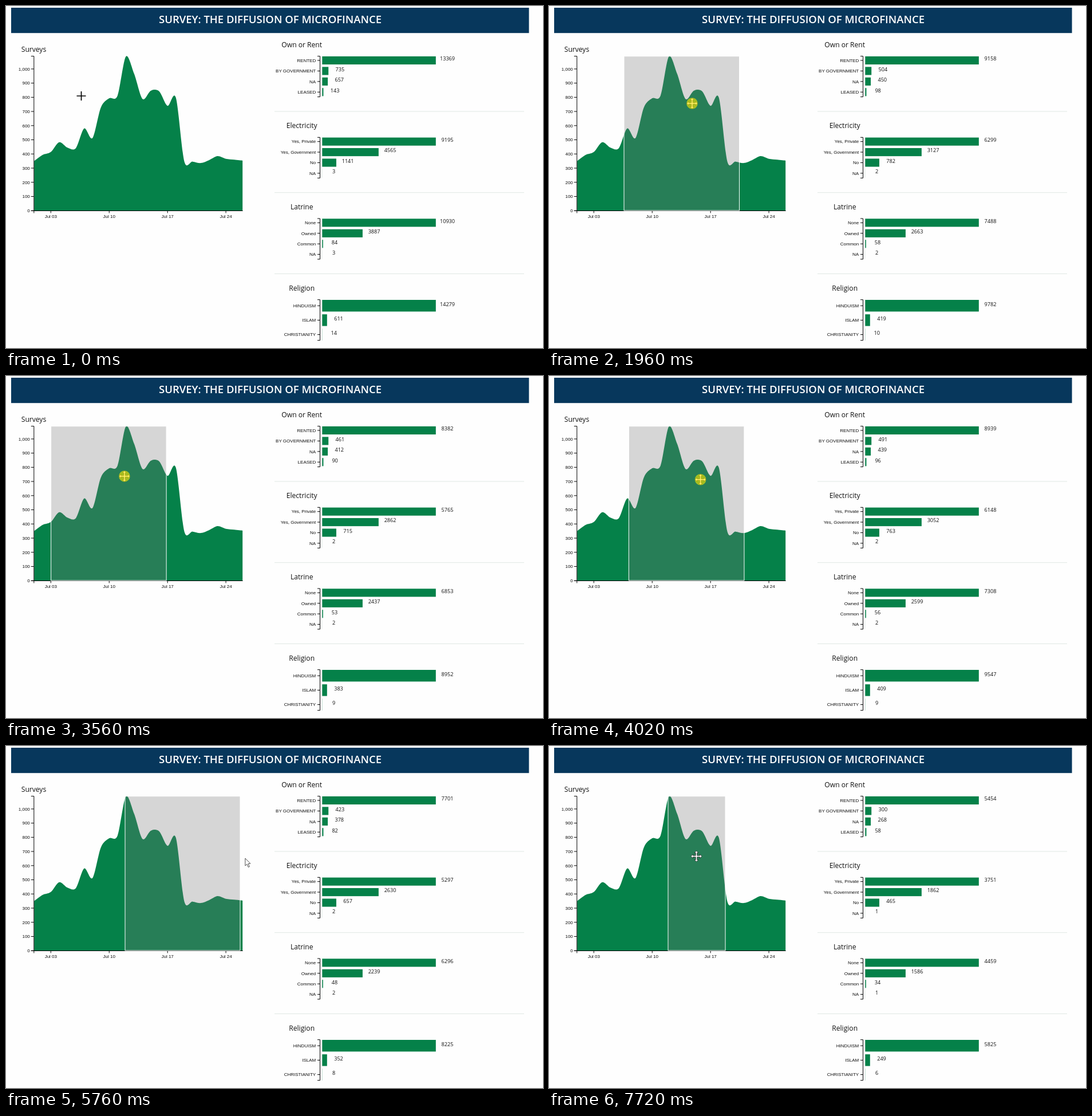
An HTML page for the animation above (8 s loop, 938 px wide and 597 px high).

```html
<!DOCTYPE html>
<html lang="en">
<head>
<meta charset="utf-8">
<title>Survey dashboard</title>
<style>
  html, body { margin: 0; width: 100%; height: 100%; overflow: hidden; background: #fefefe; }
  svg { display: block; width: 938px; height: 597px; }
  .ui { font-family: "Open Sans", "Noto Sans", sans-serif; fill: #111; text-anchor: middle; }
  .title { font-size: 18.5px; font-weight: 600; fill: #fff; }
  .head { font-size: 12.1px; }
  .num { font-size: 9.1px; }
  .tick { font: 8px "Liberation Sans", Arial, sans-serif; fill: #111; }
  .axis { fill: none; stroke: #000; stroke-width: 1; }
  .green { fill: #058149; }
</style>
</head>
<body>
<svg id="stage" viewBox="0 0 938 597" xmlns="http://www.w3.org/2000/svg"></svg>
<script>
const LOOP = 8000;
const stage = document.getElementById('stage');

function add(tag, attrs, text) {
  const el = document.createElementNS('http://www.w3.org/2000/svg', tag);
  set(el, attrs);
  if (text !== undefined) el.textContent = text;
  return stage.appendChild(el);
}
function set(el, attrs) {
  for (const k in attrs) el.setAttribute(k, attrs[k]);
}

const clamp = u => Math.max(0, Math.min(1, u));
const smooth = u => u * u * (3 - 2 * u);
const easeOut = u => 1 - (1 - u) ** 3;
const easeIn = u => u ** 1.75;

// Runs through moves of the form [from, to, [x, y], easing]
function track(value, moves, t) {
  for (const [from, to, goal, ease = smooth] of moves) {
    const f = ease(clamp((t - from) / (to - from)));
    value = value.map((v, i) => v + (goal[i] - v) * f);
  }
  return value;
}

// ---- Area chart ----
const daily = [350, 393, 414, 483, 445, 441, 580, 512, 728, 793, 812, 1088, 965,
  788, 847, 842, 740, 797, 350, 346, 336, 357, 385, 366, 360, 354];
const sum = list => list.reduce((a, b) => a + b, 0);
const surveys = sum(daily);
const dayX = i => 49.2 + 14.56 * i;
const countY = v => 357.2 - 0.2473 * v;

function areaPath() {
  const pts = daily.map((v, i) => [dayX(i), countY(v)]);
  const slope = i => {
    const a = pts[i - 1], b = pts[i + 1];
    return a && b ? [0.15 * (b[0] - a[0]), 0.15 * (b[1] - a[1])] : [0, 0];
  };
  let d = `M${pts[0]}`;
  for (let i = 1; i < pts.length; i++) {
    const p = pts[i - 1], q = pts[i], m = slope(i - 1), n = slope(i);
    d += `C${p[0] + m[0]},${p[1] + m[1]} ${q[0] - n[0]},${q[1] - n[1]} ${q}`;
  }
  return d + 'V357.5H49.2Z';
}

add('rect', { width: 938, height: 597, fill: '#fefefe' });
add('rect', { x: 9, y: 3, width: 904.5, height: 44.2, fill: '#07375c' });
add('text', { x: 461.5, y: 30, class: 'ui title' }, 'SURVEY: THE DIFFUSION OF MICROFINANCE');
add('text', { x: 48.5, y: 79.6, class: 'ui head' }, 'Surveys');
add('path', { d: areaPath(), class: 'green' });
add('path', { d: 'M43.8 87.6H48.8V357.5H43.8M48.8 361.5V357.5H413.5', class: 'axis' });
for (let v = 0; v <= 1000; v += 100) {
  const y = countY(v);
  add('path', { d: `M43.8 ${y}H48.8`, class: 'axis' });
  add('text', { x: 41.8, y: y + 2.8, class: 'tick', 'text-anchor': 'end' }, v.toLocaleString('en-US'));
}
for (let i = 2; i < daily.length; i += 7) {
  const x = dayX(i);
  add('path', { d: `M${x} 357.5V361.5`, class: 'axis' });
  add('text', { x, y: 369.8, class: 'tick', 'text-anchor': 'middle' }, 'Jul ' + String(i + 1).padStart(2, '0'));
}
const brush = add('rect', { y: 87.7, height: 269.3, fill: '#777', 'fill-opacity': 0.3, stroke: '#fff' });

// ---- Row charts; squash: how much the rows collapse when they are rebuilt ----
const charts = [
  { name: 'Own or Rent', squash: 1, rows: { RENTED: 13369, 'BY GOVERNMENT': 735, NA: 657, LEASED: 143 } },
  { name: 'Electricity', squash: 1, rows: { 'Yes, Private': 9195, 'Yes, Government': 4565, No: 1141, NA: 3 } },
  { name: 'Latrine', squash: 0, rows: { None: 10930, Owned: 3887, Common: 84, NA: 3 } },
  { name: 'Religion', squash: 0.6, rows: { HINDUISM: 14279, ISLAM: 611, CHRISTIANITY: 14 } }
];
const BAR_X = 552.3, BAR_MAX = 198.5, GAP = 4.3;

charts.forEach((c, k) => {
  const rows = Object.entries(c.rows);
  c.top = 87.6 + 141.7 * k;
  c.size = (71 + GAP) / rows.length - GAP - 0.4;
  c.pitch = (71 + GAP) / rows.length - 0.4;
  if (rows.length === 3) c.pitch += 0.5;
  add('text', { x: 516.7, y: c.top - 16, class: 'ui head' }, c.name);
  if (k) add('path', { d: `M469 ${c.top - 45.3}H905`, stroke: '#dfe8e3', fill: 'none' });
  add('path', { d: `M544 ${c.top}H548.5V${c.top + 71}H544`, class: 'axis' });
  c.rows = rows.map(([label, count], i) => {
    const mid = c.top + 0.3 + c.pitch * i + c.size / 2;
    return {
      count, mid,
      bar: add('rect', { x: BAR_X, class: 'green' }),
      tick: add('path', { d: `M544 ${mid}H548.5`, class: 'axis' }),
      label: add('text', { x: 541.2, y: mid + 2.8, class: 'tick', 'text-anchor': 'end' }, label),
      num: add('text', { class: 'ui num' })
    };
  });
});

// ---- Pointer ----
const shapes = {
  cross: add('path', { d: 'M-8 0H8M0-8V8', stroke: '#fff', 'stroke-width': 1.7, style: 'mix-blend-mode:difference' }),
  move: add('path', { d: 'M0-9.5L3.5-6H1.3V-1.3H6V-3.5L9.5 0L6 3.5V1.3H1.3V6H3.5L0 9.5L-3.5 6H-1.3V1.3H-6V3.5L-9.5 0L-6-3.5V-1.3H-1.3V-6H-3.5Z' }),
  arrow: add('path', { d: 'M0 0V13L3 10.2L5.4 15.5L7.5 14.6L5.1 9.5L9 9.2Z' }),
  resize: add('path', { d: 'M-9 0L-5-4V-1.3H5V-4L9 0L5 4V1.3H-5V4Z' })
};
for (const k of ['move', 'arrow', 'resize']) set(shapes[k], { fill: '#fff', stroke: '#222', 'stroke-width': 0.8 });
const glow = add('circle', { r: 9.8, fill: '#f4e600', 'fill-opacity': 0.62 });

// ---- Timeline: the pointer leads, the brush follows ----
const pointerMoves = [
  [60, 250, [132, 153]],
  [400, 1080, [333, 168], easeOut],
  [1270, 1490, [250, 170]],
  [2050, 2900, [168, 171]],
  [3150, 4110, [267, 181]],
  [4180, 5000, [329, 190]],
  [5200, 5370, [424, 199]],
  [5370, 6200, [410.5, 192.5]],
  [6540, 7410, [309, 192.5]],
  [7410, 7720, [257.5, 192.5]]
];
const brushMoves = [
  [400, 1080, [132, 333], easeIn],
  [1600, 1960, [131, 332.5]],
  [2050, 2950, [49, 250.5]],
  [3200, 4190, [147, 348.5]],
  [4250, 5140, [208, 409]],
  [6540, 7410, [208, 308]]
];
const cursors = [[0, 'cross'], [1340, 'move'], [5300, 'arrow'], [6000, 'resize'], [7480, 'move']];
const pressed = [[250, 1340], [1640, 5230], [6460, 7480]];

function drawRows(t, selected) {
  const p = t > 400 ? easeOut(clamp((t - 475) / 605)) : 1;
  for (const c of charts) {
    const max = c.rows[0].count;
    c.rows.forEach((row, i) => {
      const value = Math.round(row.count * selected / surveys);
      const own = row.count < 20 ? p * p : p;
      const q = 1 - (1 - own) * c.squash;
      const width = value ? BAR_MAX * row.count / max * p : 0;
      set(row.bar, { y: c.top + 0.3 + c.pitch * i * q, width, height: c.size * q });
      set(row.tick, { opacity: own });
      set(row.label, { opacity: own });
      set(row.num, { x: BAR_X + 0.2 + width + 20 * own, y: c.top + (row.mid - 3 - c.top) * q + 3.3, opacity: value ? 1 : 0 });
      row.num.textContent = value;
    });
  }
}

function draw(t) {
  const [a, b] = track([132, 132], brushMoves, t);
  const brushed = t > 400;
  set(brush, { x: a, width: b - a, visibility: brushed ? 'visible' : 'hidden' });
  drawRows(t, sum(daily.filter((v, i) => !brushed || (dayX(i) > a && dayX(i) < b))));

  const [x, y] = track([131.5, 157], pointerMoves, t);
  const kind = cursors.filter(c => c[0] <= t).pop()[1];
  for (const k in shapes) {
    set(shapes[k], { transform: `translate(${x} ${y})`, visibility: k === kind ? 'visible' : 'hidden' });
  }
  const down = pressed.some(([from, to]) => t >= from && t < to);
  set(glow, { cx: x, cy: y, visibility: down ? 'visible' : 'hidden' });
}

const start = performance.now();
function tick() {
  draw((performance.now() - start) % LOOP);
  requestAnimationFrame(tick);
}
tick();
</script>
</body>
</html>
```
